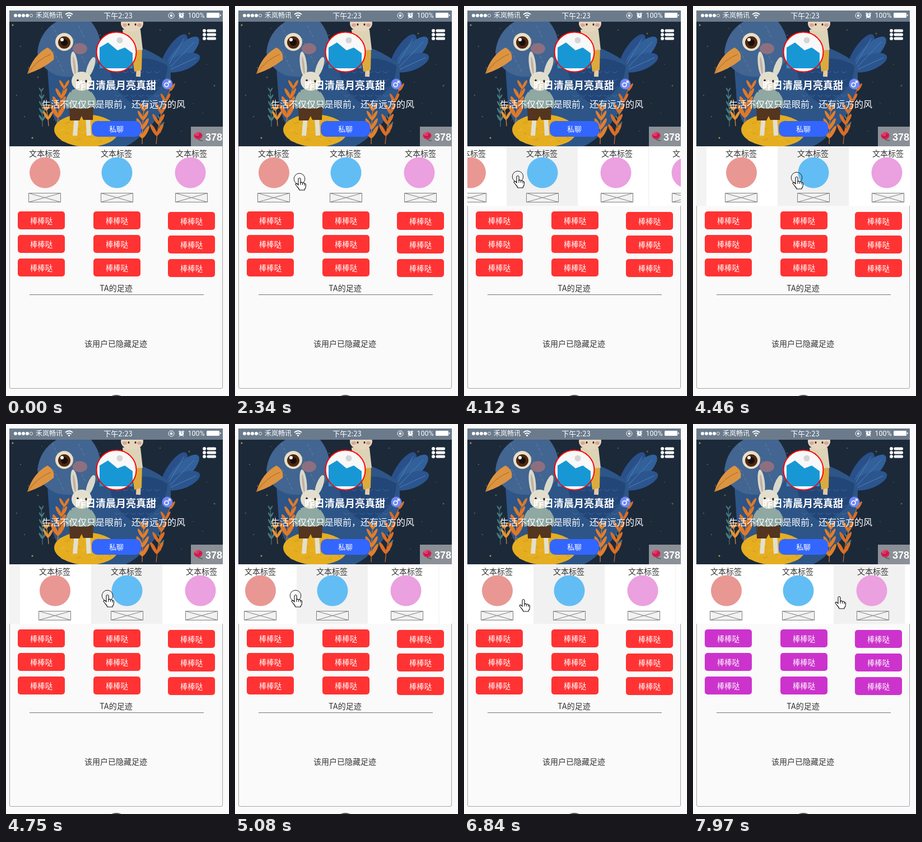
Write an HTML page with a canvas that moves like this. It is 398x695 px and loops after 8000 ms.

```html
<!DOCTYPE html>
<html lang="zh-CN">
<head>
<meta charset="utf-8">
<title>Profile page</title>
<style>
html, body { margin: 0; width: 100%; height: 100%; overflow: hidden; background: #fafafa; }
canvas { display: block; }
</style>
</head>
<body>
<canvas id="stage" width="398" height="695"></canvas>
<script>
const W = 398, H = 695, LOOP = 8000;
const stage = document.getElementById('stage').getContext('2d');
const backdrop = document.createElement('canvas');
backdrop.width = W;
backdrop.height = H;
let c = backdrop.getContext('2d');
const SANS = '"Noto Sans CJK SC", "Noto Sans CJK", sans-serif';

// Drawing helpers
function fill(color, d) { c.fillStyle = color; c.fill(new Path2D(d)); }
function line(color, width, d) {
  c.strokeStyle = color;
  c.lineWidth = width;
  c.stroke(new Path2D(d));
}
function rect(color, x, y, w, h, r = 0) {
  c.fillStyle = color;
  c.beginPath();
  c.roundRect(x, y, w, h, r);
  c.fill();
}
function oval(color, x, y, rx, ry = rx, turn = 0) {
  c.fillStyle = color;
  c.beginPath();
  c.ellipse(x, y, rx, ry, turn, 0, 7);
  c.fill();
}
function ring(color, width, x, y, r) {
  c.strokeStyle = color;
  c.lineWidth = width;
  c.beginPath();
  c.arc(x, y, r, 0, 7);
  c.stroke();
}
function text(str, x, y, size, color = '#333', weight = 400, font = SANS) {
  c.font = `${weight} ${size}px ${font}`;
  c.textAlign = 'center';
  c.fillStyle = color;
  c.fillText(str, x, y + size * 0.37);
}
function clipTo(x, y, w, h, draw) {
  c.save();
  c.beginPath();
  c.rect(x, y, w, h);
  c.clip();
  draw();
  c.restore();
}

function plant(x, y, height, lean, color, rows, size) {
  line(color, 1.2, `M${x} ${y} q${lean * .2} ${-height * .6} ${lean} ${-height}`);
  for (let i = 0; i < rows; i++) {
    const k = (i + 1) / rows, px = x + lean * k * k, py = y - height * k;
    const len = size * (1 - .4 * k), off = len * .45;
    oval(color, px - off, py - off, len, len * .27, 1.05);
    oval(color, px + off, py - off, len, len * .27, -1.05);
  }
}

function bird() {
  oval('#2a508a', 300, 84, 39, 14, -1);
  oval('#31609b', 316, 83, 38, 14, -.78);
  oval('#2b558f', 314, 101, 34, 14, -.35);
  line('#5580b3', 1, 'M288 108 L318 58 M292 110 L336 64 M294 113 L340 92');
  fill('#2d5587', 'M74 112 L160 60 L196 64 Q256 72 292 104 Q304 170 250 222 Q232 242 214 250 H124 Q82 214 78 168 Z');
  fill('#426591', 'M56 82 Q60 46 90 28 H152 Q178 60 164 100 Q138 134 92 124 Q60 112 56 82 Z');
  fill('#234678', 'M186 118 Q236 76 288 106 Q288 152 232 176 Q196 160 186 118 Z');
  c.globalAlpha = .4;
  for (let i = 0; i < 24; i++) {
    const x = 194 + i % 6 * 14, y = 116 + Math.floor(i / 6) * 14;
    line('#6f95bd', 1, `M${x} ${y} q5 6 10 0`);
  }
  for (let i = 0; i < 22; i++) {
    const x = 82 + i * 37 % 72, y = 34 + i * 23 % 84;
    line('#91aabd', 1, `M${x} ${y} l3 5`);
  }
  c.globalAlpha = 1;
  fill('#dd9440', 'M74 74 Q48 88 38 121 Q64 113 85 96 Q88 82 74 74 Z');
  line('#a9632a', 1, 'M80 86 Q56 95 39 120');
  oval('#8d6f80', 132, 76, 13, 10);
  oval('#e9dfc4', 104, 64, 16);
  oval('#4c2714', 104, 65, 11);
  oval('#180f0b', 104, 65, 6);
  oval('#fff', 100, 60, 3);
}

function rabbit() {
  oval('#d9d9cb', 122, 104, 6, 23, -.12);
  oval('#d9d9cb', 151, 109, 6, 19, .35);
  oval('#c3aea2', 122, 106, 2, 16, -.12);
  line('#e3dfcf', 8, 'M126 196 L123 231 M146 196 L148 231');
  fill('#8fa8a2', 'M117 150 Q134 142 150 152 L154 184 Q134 190 114 183 Z');
  fill('#54351f', 'M113 180 Q134 186 156 180 L155 203 H138 L135 196 L131 204 H114 Z');
  line('#8fa8a2', 8, 'M118 155 Q107 168 112 182 M149 155 Q160 168 157 180');
  oval('#e3dfcf', 135, 134, 18, 17);
  oval('#332a28', 128, 133, 1.8, 2.5);
  oval('#332a28', 143, 134, 1.8, 2.5);
  oval('#cf9f90', 136, 139, 2.5, 2);
}

function child() {
  line('#e3c9a4', 8, 'M237 100 L236 126');
  fill('#dcaa3f', 'M213 62 Q234 54 243 74 L242 114 L229 117 L226 95 L211 91 Z');
  fill('#ddd3b6', 'M208 42 H240 L244 78 L212 80 Z');
  oval('#e6d6bd', 225, 31, 20, 15);
  oval('#d9a596', 212, 34, 4, 3);
  oval('#d9a596', 238, 34, 4, 3);
  oval('#35272a', 219, 33, 1.5, 2);
  oval('#35272a', 231, 33, 1.5, 2);
}

function picture() {
  rect('#1c2939', 6, 28, 381, 222);
  for (let i = 0; i < 46; i++) {
    const x = 12 + i * 83 % 370, y = 34 + i * 61 % 212;
    oval(i % 3 ? '#5f6046' : '#b09848', x, y, i % 5 ? .8 : 1.5);
  }
  bird();
  plant(65, 215, 64, -2, '#467a80', 5, 7);
  plant(276, 226, 46, 2, '#467a80', 4, 7);
  plant(92, 210, 66, 12, '#df7928', 4, 15);
  plant(76, 214, 30, -4, '#e49235', 2, 11);
  plant(243, 246, 62, 3, '#e17e2b', 4, 14);
  plant(268, 246, 98, 26, '#d96e27', 5, 13);
  oval('#e5ad20', 143, 222, 57, 29, .04);
  c.globalAlpha = .5;
  for (let i = 0; i < 32; i++) {
    const x = 94 + i * 29 % 96, y = 203 + i * 17 % 38;
    line(i % 2 ? '#b47a19' : '#f4d154', 1, `M${x} ${y} l5 2`);
  }
  c.globalAlpha = 1;
  rabbit();
  child();
}

function statusBar() {
  rect('#6b7b8c', 6, 8, 381, 20);
  for (let i = 0; i < 4; i++) oval('#fff', 17 + i * 7, 17, 3);
  ring('#fff', .8, 45, 17, 2.6);
  text('禾岚畅讯', 77, 17, 12, '#fff');
  line('#fff', 1.8, 'M106 15 Q112.5 9.5 119 15 M108.5 18 Q112.5 14.5 116.5 18');
  oval('#fff', 112.5, 20.5, 1.6);
  text('下午2:23', 200, 17, 13, '#fff', 500);
  ring('#fff', 1, 295, 17, 5);
  rect('#fff', 293, 16, 4, 3);
  line('#fff', .8, 'M293.7 16 v-1 q1.3 -2 2.6 0 v1');
  oval('#fff', 313, 17, 4.3);
  line('#fff', 1.5, 'M308 14 l3 -2 M315 12 l3 2 M310 21 l-1 1 M316 21 l1 1');
  line('#6b7b8c', 1, 'M313 14 v3 h2');
  text('100%', 339.5, 16.5, 12.5, '#fff', 400, 'Roboto, sans-serif');
  rect('#fff', 358, 12, 23, 9, 1.5);
  rect('#fff', 382, 15, 1.5, 3);
}

function header() {
  clipTo(6, 28, 381, 222, picture);
  oval('#f8f8f8', 197, 82, 36);
  fill('#1798d5', 'M167 74 L182 65 L199 79 L212 74 L226 84 V111 H167 Z');
  oval('#d5d5d5', 203, 61, 5.5);
  ring('#f00', 2, 197, 82, 35.5);
  text('昨日清晨月亮真甜', 196, 141, 18, '#fff', 700);
  oval('#7188f3', 288, 139, 9.5);
  ring('#fff', 1.6, 286.5, 140.5, 3.5);
  line('#fff', 1.4, 'M289 138 L293 134 M289.5 134 H293 V137.5');
  text('生活不仅仅只是眼前，还有远方的风', 192, 175, 16, '#fff');
  rect('#36f', 153, 205, 88, 28, 10);
  text('私聊', 197, 219, 13, '#fff', 500);
  for (let y = 44; y < 60; y += 7) {
    oval('#fff', 354, y, 3);
    rect('#fff', 358.5, y - 2.5, 16.5, 5, 2);
  }
  rect('rgba(158,161,167,.86)', 330, 215, 57, 35);
  line('#4d6551', 1.5, 'M342 236 Q345 240 351 240');
  oval('#d91e55', 343, 231, 7.5, 6.5);
  oval('#ef4775', 341, 228, 4, 3);
  line('#9f153e', 1, 'M337 231 Q343 237 349 229 M340 229 Q344 226 346 231');
  text('378', 371, 233, 18, '#fff', 700, '"Liberation Sans", Arial, sans-serif');
}

function scenery() {
  rect('#fafafa', 0, 0, W, H);
  statusBar();
  header();
  line('#a5a5ab', 1, 'M6.5 250 V679 Q6.5 681.5 9 681.5 H384 Q386.5 681.5 386.5 679 V250');
  text('TA的足迹', 196.5, 503, 14);
  line('#777', 1, 'M42 514.5 H353');
  text('该用户已隐藏足迹', 196, 602, 14);
  ring('#555', 2, 197, 713, 19);
}

// Tabs: label centre, icon centre, box left edge, icon colour
const TAB_W = 127;
const TABS = [
  [62, 62.5, 33, '#e99793'],
  [63, 64, 35, '#62bdf4'],
  [70, 68, 41, '#eba0df'],
  [70, 68, 41, '#eba0df']
];
function tabs(shift, active) {
  if (active >= 0) rect('#f3f3f3', 6, 250, 381, 106);
  TABS.forEach(([label, icon, box, color], i) => {
    const x = 7 + shift + i * TAB_W;
    if (active >= 0) {
      rect(i === active ? '#f1f1f1' : '#fff', x, 250, TAB_W, 106);
      if (i === 3) rect('#f3f3f3', x - 1, 250, 1.5, 106);
    }
    text('文本标签', x + label, 263, 14);
    oval(color, x + icon, 297, 27.5);
    const l = x + box + .5;
    fill('#f2f2f2', `M${l} 333.5 h57 v16 h-57 Z`);
    line('#808080', 1, `M${l} 333.5 h57 v16 h-57 Z l57 16 m0 -16 l-57 16`);
  });
}

function buttons(color) {
  [21, 156, 289].forEach((x, col) => {
    for (let row = 0; row < 3; row++) {
      const y = 366 + row * 42 + (col === 2 ? 1 : 0);
      rect(color, x, y, 84, 32, 5);
      text('棒棒哒', x + 42, y + 17, 13.33, '#fff');
    }
  });
}

// Tracks of [time, ...values], eased between neighbours
const POINTER = [
  [1410, 114.5, 307.5], [2520, 114.5, 307.5], [2990, 141, 308], [3140, 141, 308],
  [3410, 154.5, 308], [3590, 154.5, 308], [4160, 95, 303.5], [4240, 95, 303.5],
  [4520, 197, 306], [4620, 197, 306], [5110, 107, 306], [5500, 107, 306],
  [5880, 156, 309], [6300, 119.5, 311], [6330, 119.5, 311], [6500, 105.5, 313.5],
  [6920, 105.5, 313.5], [7400, 259.5, 311.5], [7880, 259.5, 311.5], [7970, 261, 308.5]
];
const STRIP = [
  [3590, 0], [4160, -59], [4240, -59], [4520, 27], [4620, 27],
  [5110, -25], [5500, -25], [5880, 27], [6300, -10]
];
const PRESSED = [[2340, 2520], [3410, 6360], [6720, 6840], [7710, 7860]];

function sample(track, t) {
  const next = track.findIndex(key => key[0] > t);
  if (next === 0) return track[0].slice(1);
  if (next < 0) return track[track.length - 1].slice(1);
  const a = track[next - 1], b = track[next];
  const u = (t - a[0]) / (b[0] - a[0]), k = u * u * (3 - 2 * u);
  return a.slice(1).map((v, i) => v + (b[i + 1] - v) * k);
}

function pointerAt(t) {
  if (t >= 1410) return sample(POINTER, t);
  const u = 1 - (1 - (t - 960) / 450) ** 1.5, v = 1 - u;
  return [
    395 * v * v + 500 * u * v + 114.5 * u * u,
    372 * v * v + 744 * u * v + 307.5 * u * u
  ];
}

function pointer(t) {
  if (t < 960) return;
  const [x, y] = pointerAt(t).map(Math.round);
  if (PRESSED.some(([from, to]) => t >= from && t < to)) ring('#222', 1, x, y, 9.8);
  c.save();
  c.translate(x, y - 1);
  const hand = 'M-2 1 Q0 -2 2 1 V8 Q4 6 5.5 8.5 Q8 7 9 9.5 Q11.5 9 11.5 12 L11 17 Q9 19 9 21 H0 Q-1 18 -4 15 L-7 11 Q-6 8 -3.5 10.5 L-2 12 Z';
  fill('#fff', hand);
  line('#111', 1.1, hand);
  line('#111', 1, 'M2 8 V12 M5.5 9 V12 M9 10 V13');
  c.restore();
}

function state(t) {
  if (t < 3590) return [-1, '#f33'];
  if (t < 6920) return [1, '#f33'];
  if (t < 7890) return [0, '#f93'];
  return [2, '#c3c'];
}

function frame() {
  const t = performance.now() % LOOP;
  const [active, color] = state(t);
  c.drawImage(backdrop, 0, 0);
  clipTo(6, 250, 381, 106, () => tabs(Math.round(sample(STRIP, t)[0]), active));
  buttons(color);
  clipTo(0, 0, 388, H, () => pointer(t));
  requestAnimationFrame(frame);
}

scenery();
c = stage;
frame();
</script>
</body>
</html>
```
